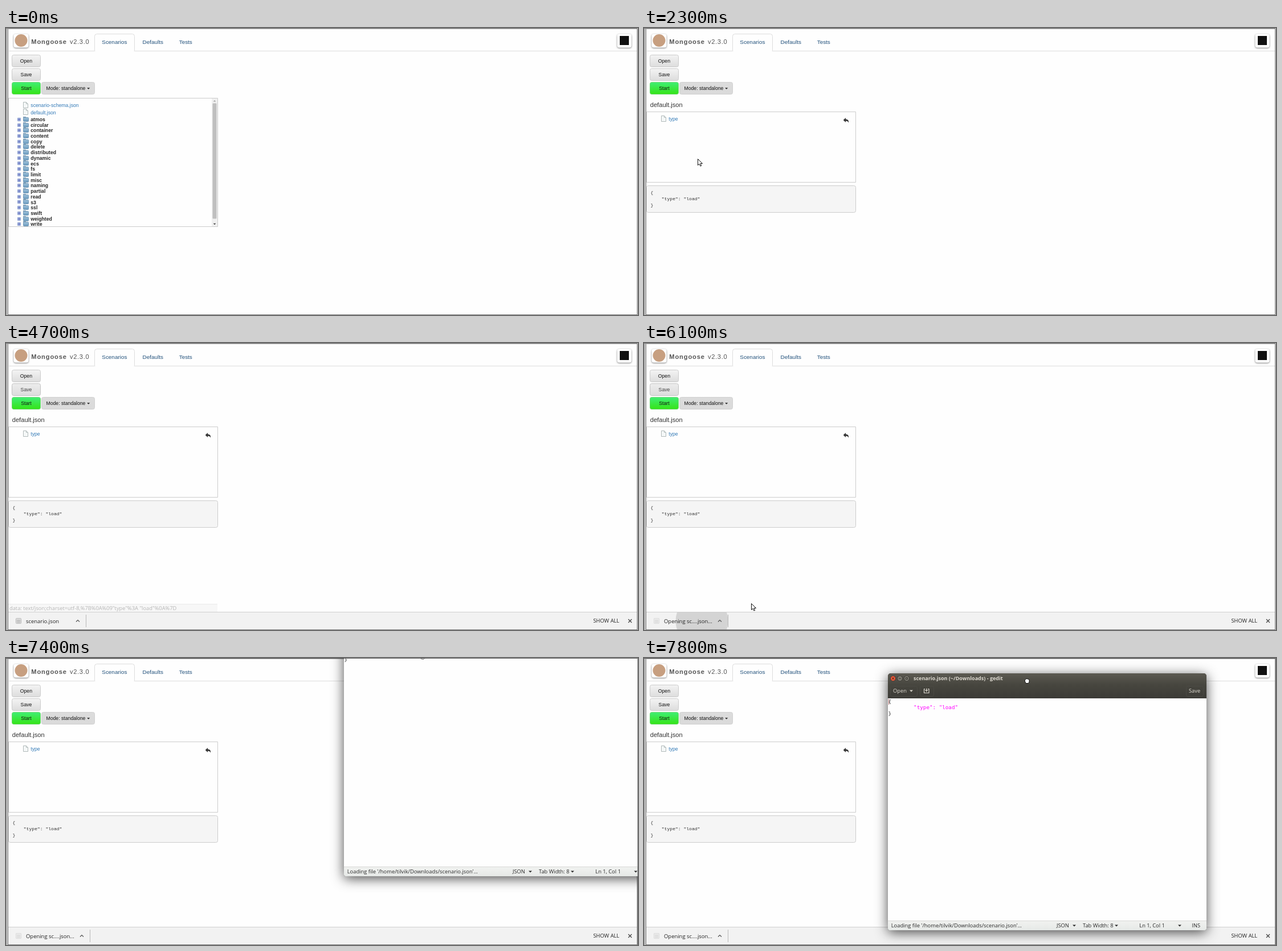
An HTML page with a canvas for the animation above (8000 ms loop, 1109 by 505 pixels).

```html
<!DOCTYPE html>
<html lang="en">
<head>
<meta charset="utf-8">
<title>Scenario editor</title>
<style>
html, body { margin: 0; width: 100%; height: 100%; overflow: hidden; background: #fefefe; }
canvas { display: block; }
</style>
</head>
<body>
<canvas id="stage" width="1109" height="505"></canvas>
<script>
const W = 1109, H = 505, LOOP = 8000, STEP = 100;
const ctx = document.getElementById('stage').getContext('2d');
const SANS = '"Liberation Sans", Arial, sans-serif';
const UI = '"Open Sans", "Noto Sans", sans-serif';
const CODE = '"Liberation Mono", monospace';
const EDIT = '"DejaVu Sans Mono", monospace';
const FOLDERS = ('atmos circular container content copy delete distributed dynamic ecs fs ' +
  'limit misc naming partial read s3 ssl swift weighted write').split(' ');

// Pointer runs as [time, x, y]; each run ends with the pointer off stage or at rest.
const RUNS = [
  [[100, 1096, 21], [200, 930, 35], [300, 530, 73], [400, 115, 160], [500, 81, 156], [900, 76, 151],
   [1800, 76, 151], [1900, 81, 184], [2000, 83, 204], [2100, 90, 223], [2200, 94, 230], [2400, 94, 230],
   [2500, 86, 256], [2600, 89, 264], [2700, 89, 270], [2800, 172, 203], [2900, 255, 182], [3000, 210, 175],
   [3100, 194, 174], [3200, 187, 175], [3300, 150, 182], [3400, 79, 129], [3700, 38, 81], [4300, 38, 81],
   [4400, 118, 78], [4500, 388, 47]],
  [[4900, 700, 0], [5000, 480, 247], [5100, 372, 311], [5200, 270, 360], [5300, 189, 411],
   [5500, 101, 486], [6000, 101, 486], [6100, 188, 458], [6200, 399, 287], [6300, 607, 110], [6400, 808, -6]]
];

const clamp = v => Math.max(0, Math.min(1, v));
const mix = (a, b, k) => a + (b - a) * k;

function pointerAt(t) {
  for (const run of RUNS) {
    if (t < run[0][0] || t > run[run.length - 1][0]) continue;
    const i = Math.max(1, run.findIndex(p => p[0] >= t));
    const [a, b] = [run[i - 1], run[i]], k = (t - a[0]) / (b[0] - a[0]);
    return [Math.round(mix(a[1], b[1], k)), Math.round(mix(a[2], b[2], k))];
  }
  return null;
}

function fill(x, y, w, h, color) {
  ctx.fillStyle = color;
  ctx.fillRect(x, y, w, h);
}

function box(x, y, w, h, r, color, border) {
  ctx.beginPath();
  ctx.roundRect(x + .5, y + .5, w - 1, h - 1, r);
  if (color) { ctx.fillStyle = color; ctx.fill(); }
  if (border) { ctx.strokeStyle = border; ctx.lineWidth = 1; ctx.stroke(); }
}

function grad(y, h, ...colors) {
  const g = ctx.createLinearGradient(0, y, 0, y + h);
  colors.forEach((c, i) => g.addColorStop(i / (colors.length - 1), c));
  return g;
}

// Text with its capitals centred on y.
function text(s, x, y, size, color, family = SANS, weight = '', spacing = 0) {
  ctx.font = `${weight} ${size}px ${family}`;
  ctx.letterSpacing = spacing + 'px';
  ctx.fillStyle = color;
  ctx.fillText(s, x, y + size * .36);
  ctx.letterSpacing = '0px';
}

function poly(points, color, border, width = 1) {
  ctx.beginPath();
  for (let i = 0; i < points.length; i += 2) ctx.lineTo(points[i], points[i + 1]);
  ctx.closePath();
  if (color) { ctx.fillStyle = color; ctx.fill(); }
  if (border) { ctx.strokeStyle = border; ctx.lineWidth = width; ctx.stroke(); }
}

function line(color, width, ...points) {
  ctx.beginPath();
  for (let i = 0; i < points.length; i += 2) ctx.lineTo(points[i], points[i + 1]);
  ctx.strokeStyle = color;
  ctx.lineWidth = width;
  ctx.stroke();
}

const caret = (x, y, color, r = 3) => poly([x - r, y - r / 2, x + r, y - r / 2, x, y + r / 2], color);

function disc(x, y, r, color) {
  ctx.beginPath();
  ctx.arc(x, y, r, 0, 7);
  ctx.fillStyle = color;
  ctx.fill();
}

function shadowed(blur, dy, color, draw) {
  ctx.save();
  ctx.shadowBlur = blur;
  ctx.shadowOffsetY = dy;
  ctx.shadowColor = color;
  draw();
  ctx.restore();
}

function button(x, y, w, label, lx, top, bottom, border, ink = '#111') {
  box(x, y, w, 22, 3, grad(y, 22, top, bottom), border);
  text(label, lx, y + 11, 8.68, ink);
}

function fileIcon(x, y) {
  poly([x + .5, y + .5, x + 5.5, y + .5, x + 8.5, y + 3.5, x + 8.5, y + 10.5, x + .5, y + 10.5], '#f5f8f8', '#a9b3b3', .9);
  line('#a9b3b3', .8, x + 5.5, y + .5, x + 5.5, y + 3.5, x + 8.5, y + 3.5);
}

function folderRow(name, y) {
  const top = Math.round(y) - 4;
  box(20, top + 1, 6, 6, 0, '#eef2ff', '#8096cc');
  fill(21, top + 3.5, 4, 1, '#3346a8');
  fill(22.5, top + 2, 1, 4, '#3346a8');
  fill(30, top - 1, 5, 2, '#7f9fb8');
  box(30, top, 10, 8, 1, grad(top, 8, '#a5c6de', '#6496bb'), '#7399b6');
  text(name, 43.3, y, 8.68, '#262626', SANS, 'bold');
}

function page(saveHot) {
  fill(0, 0, W, H, '#fefefe');
  fill(5, 40, 1102, 1, '#ddd');
  box(155, 10, 71, 34, 4, '#fefefe', '#ddd');
  fill(154, 41, 74, 4, '#fefefe');
  shadowed(3, 1, 'rgba(0,0,0,.5)', () => {
    box(13, 10, 27, 25, 4, '#fff');
    box(1072, 10, 26, 25, 4, '#fff');
  });
  disc(26.5, 22, 11, '#c79f80');
  fill(1077, 14, 16, 16, '#111');
  text('Mongoose', 44.3, 23.5, 11.16, '#555', SANS, 'bold', .85);
  text('v2.3.0', 112, 23.5, 11.16, '#555', SANS, '', .65);
  text('Scenarios', 168.3, 24.5, 9.92, '#23527c');
  text('Defaults', 239.6, 24.5, 9.92, '#23527c');
  text('Tests', 303.7, 24.5, 9.92, '#23527c');
  button(10, 47, 51, 'Open', 24.8, '#f4f4f4', '#dcdcdc', '#ccc');
  button(10, 71, 51, 'Save', 25.6, saveHot ? '#ededed' : '#f4f4f4', '#dcdcdc', saveHot ? '#c2c2c2' : '#ccc', saveHot ? '#444' : '#111');
  button(10, 95, 51, 'Start', 26.3, '#3fee76', '#35e314', '#6fd873');
  button(62, 95, 94, 'Mode: standalone', 70.5, '#dcdcdc', '#dadada', '#d0d0d0');
  caret(144.7, 106.5, '#222', 2.6);
}

function tree(hot) {
  ctx.save();
  ctx.beginPath();
  ctx.rect(4, 123, 368, 226);
  ctx.clip();
  fileIcon(30, 130);
  fileIcon(30, 142);
  text('scenario-schema.json', 43.3, 136, 8.68, '#337ab7');
  text('default.json', 43.3, 148.5, 8.68, hot ? '#23527c' : '#337ab7');
  if (hot) fill(43, 152, 45, 1, '#23527c');
  FOLDERS.forEach((name, i) => folderRow(name, 160.8 + i * 9.71));
  fill(361, 124, 10, 225, '#f0f0f0');
  box(362, 132, 8, 204, 1, '#bfbfbf');
  caret(366, 345, '#444', 2.4);
  poly([363.6, 129.4, 368.4, 129.4, 366, 127], '#a3a3a3');
  ctx.restore();
  box(4, 123, 368, 227, 0, null, '#ccc');
}

function scenario() {
  text('default.json', 10.7, 134.5, 11.16, '#333');
  box(4, 147, 368, 125, 0, null, '#ccc');
  fileIcon(30, 154);
  text('type', 43.3, 160, 8.68, '#337ab7');
  ctx.beginPath();
  ctx.moveTo(349.7, 162);
  ctx.lineTo(354, 158);
  ctx.lineTo(354, 160.4);
  ctx.quadraticCurveTo(360, 160.4, 359, 167);
  ctx.quadraticCurveTo(358, 163.6, 354, 163.6);
  ctx.lineTo(354, 166);
  ctx.fillStyle = '#333';
  ctx.fill();
  box(4, 277, 368, 48, 3, '#f5f5f5', '#ccc');
  ['{', '    "type": "load"', '}'].forEach((s, i) => text(s, 11.5, 289.3 + i * 11.1, 8.06, '#333', CODE));
}

function statusHint(t) {
  const alpha = t < 4600 ? 1 : clamp((4900 - t) / 400);
  ctx.save();
  ctx.globalAlpha = alpha;
  fill(4, 459, 367, 14, '#f2f2f2');
  fill(4, 459, 367, 1, '#ddd');
  text('data: text/json;charset=utf-8,%7B%0A%09"type"%3A "load"%0A%7D', 6, 466.5, 9.3, '#777', UI);
  ctx.restore();
}

function arrowDown(x, y, alpha) {
  ctx.save();
  ctx.globalAlpha = alpha;
  poly([x - 2, y - 9, x + 2, y - 9, x + 2, y, x + 6, y, x, y + 8, x - 6, y, x - 2, y], '#4a86d8');
  ctx.restore();
}

function downloadBar(t) {
  const rise = clamp((t - 4100) / 300), opening = t >= 5800, shift = opening ? 7 : 0;
  ctx.save();
  ctx.translate(0, Math.round((1 - rise) * 30));
  fill(4, 473, 1103, 32, '#f2f2f2');
  fill(4, 473, 1103, 1, '#cfcfcf');
  const ripple = clamp((t - 5800) / 300);
  if (opening && t < 6500) {
    ctx.save();
    ctx.beginPath();
    ctx.rect(5, 474, 142, 30);
    ctx.clip();
    ctx.globalAlpha = t <= 6100 ? 1 : clamp((6500 - t) / 400);
    disc(101.5, 489, mix(10, 46, ripple), '#d4d4d4');
    ctx.restore();
  } else if (t >= 5500 && t < 5800) fill(5, 474, 135, 30, '#e6e6e6');
  ctx.save();
  ctx.globalAlpha = opening ? .35 : 1;
  box(17, 484, 10, 10, 1, '#e3e3e3', '#b5b5b5');
  for (let y = 487; y < 493; y += 2) fill(19, y, 6, 1, '#aaa');
  ctx.restore();
  text(opening ? 'Opening sc….json...' : 'scenario.json', 35, 489.5, 9.45, '#222', UI);
  line('#555', 1.2, 123 + shift, 490.5, 126 + shift, 487.5, 129 + shift, 490.5);
  fill(140 + shift, 478, 1, 22, '#b9b9b9');
  text('SHOW ALL', 1030.5, 489, 9.3, '#222', UI);
  line('#444', 1.3, 1092, 486, 1098, 492);
  line('#444', 1.3, 1098, 486, 1092, 492);
  ctx.restore();
  if (t >= 4200 && t < 4700) arrowDown(26, mix(440, 486, clamp((t - 4200) / 400)), mix(.8, .2, (t - 4200) / 500));
}

function editor(dx, dy) {
  ctx.save();
  ctx.translate(dx, dy);
  shadowed(21, 4, 'rgba(0,0,0,.7)', () => {
    ctx.beginPath();
    ctx.roundRect(428, 27, 559, 452, [5, 5, 3, 3]);
    ctx.fillStyle = '#3c3b37';
    ctx.fill();
  });
  ctx.save();
  ctx.beginPath();
  ctx.roundRect(428, 27, 559, 452, [5, 5, 3, 3]);
  ctx.clip();
  fill(428, 27, 559, 20, grad(27, 20, '#5c5a52', '#47463f'));
  fill(428, 47, 559, 24, grad(47, 24, '#47463f', '#3b3a36'));
  fill(428, 71, 559, 391, '#fefefe');
  fill(428, 462, 559, 17, grad(462, 17, '#f1f2f0', '#e6e9e7'));
  fill(428, 462, 559, 1, '#d8d8d6');
  ctx.restore();
  disc(437, 36, 4.8, '#35342f');
  disc(437, 36, 4.2, '#e2583a');
  line('#5a2415', 1, 435.3, 34.3, 438.7, 37.7);
  line('#5a2415', 1, 438.7, 34.3, 435.3, 37.7);
  for (const x of [449, 461]) {
    disc(x, 36, 4.8, '#35342f');
    disc(x, 36, 4.2, '#7a786f');
  }
  fill(447, 35.5, 4, 1, '#35342f');
  box(459, 34, 4, 4, 0, null, '#35342f');
  text('scenario.json (~/Downloads) - gedit', 473, 36, 9, '#dfdbd2', UI, 'bold');
  box(432, 49, 48, 19, 3, null, '#4b4a44');
  box(484, 49, 25, 19, 3, null, '#4b4a44');
  box(951, 49, 31, 19, 3, null, '#4b4a44');
  text('Open', 437, 58, 9.3, '#dfdbd2', UI);
  caret(469, 58, '#dfdbd2');
  line('#dfdbd2', 1.1, 493, 54.5, 491.5, 54.5, 491.5, 61.5, 500, 61.5, 500, 54.5, 498, 54.5);
  line('#dfdbd2', 1.2, 495.7, 53.5, 495.7, 59.5);
  line('#dfdbd2', 1.2, 493.2, 57, 498.2, 57);
  text('Save', 956, 58, 9.3, '#dfdbd2', UI);
  text('{', 428.5, 76.5, 9.26, '#333', EDIT);
  text('"type": "load"', 473.1, 86.7, 9.26, '#f0f', EDIT);
  text('}', 428.5, 97.5, 9.26, '#333', EDIT);
  fill(429, 72, 1, 10, '#a66');
  text("Loading file '/home/tilvik/Downloads/scenario.json'…", 433.7, 471, 9.36, '#2a2a2a', UI);
  text('JSON', 724, 471, 9.3, '#2a2a2a', UI);
  text('Tab Width: 8', 770, 471, 9.3, '#2a2a2a', UI);
  text('Ln 1, Col 1', 869.3, 471, 9.3, '#2a2a2a', UI);
  text('INS', 961.5, 471, 9.3, '#2a2a2a', UI);
  for (const x of [755, 829, 940]) caret(x, 471, '#2a2a2a');
  ctx.restore();
}

function arrowCursor(x, y) {
  poly([0, 0, 0, 11, 2.6, 8.7, 4.4, 12.6, 6.2, 11.8, 4.5, 8, 8, 8].map((v, i) => v + (i % 2 ? y : x) + .5), '#fff', '#111', 1);
}

function handCursor(x, y) {
  const fist = [-4, 0, -2.5, -2.5, -1, -3.5, 2, -3, 4, -1.5, 4, 2, 2.5, 4.5, -2, 4.5];
  poly(fist.map((v, i) => v + (i % 2 ? y : x)), '#fff', '#111', 1);
}

function beamCursor(x, y) {
  line('#222', 1, x - 2, y - 5.5, x + 3, y - 5.5);
  line('#222', 1, x + .5, y - 5, x + .5, y + 5);
  line('#222', 1, x - 2, y + 5.5, x + 3, y + 5.5);
}

function frameEdges() {
  fill(0, 0, 2, H, '#aaa');
  fill(2, 0, 1, H, '#e2e2e2');
  fill(3, 1, 1, H, '#777');
  fill(0, 0, W, 1, '#777');
  fill(2, 1, 1106, 1, '#aaa');
  fill(1107, 1, 1, H, '#888');
  fill(1108, 0, 1, H, '#bbb');
  fill(3, 504, 1105, 1, '#777');
}

function draw(t) {
  page(t >= 3700 && t < 6700);
  if (t < 1500) tree(t >= 900);
  else scenario();
  if (t >= 4000 && t < 4900) statusHint(t);
  if (t >= 4200) downloadBar(t);
  frameEdges();
  if (t >= 6700) {
    const k = 1 - (1 - clamp((t - 7400) / 400)) ** 2;
    editor(Math.round(mix(165, 0, k)), Math.round(mix(-95, 0, k)));
    fill(0, 0, W, 1, '#555');
    fill(1108, 0, 1, H, '#777');
    if (t === 6700) arrowCursor(607, 110);
    else if (t === 6800) beamCursor(691, 59);
    else handCursor(Math.round(mix(731, 672, k)), Math.round(mix(-3, 40, k)));
  }
  const p = pointerAt(t);
  if (p) arrowCursor(p[0], p[1]);
}

function tick(now) {
  draw(Math.floor((now % LOOP) / STEP) * STEP);
  requestAnimationFrame(tick);
}
requestAnimationFrame(tick);
</script>
</body>
</html>
```
